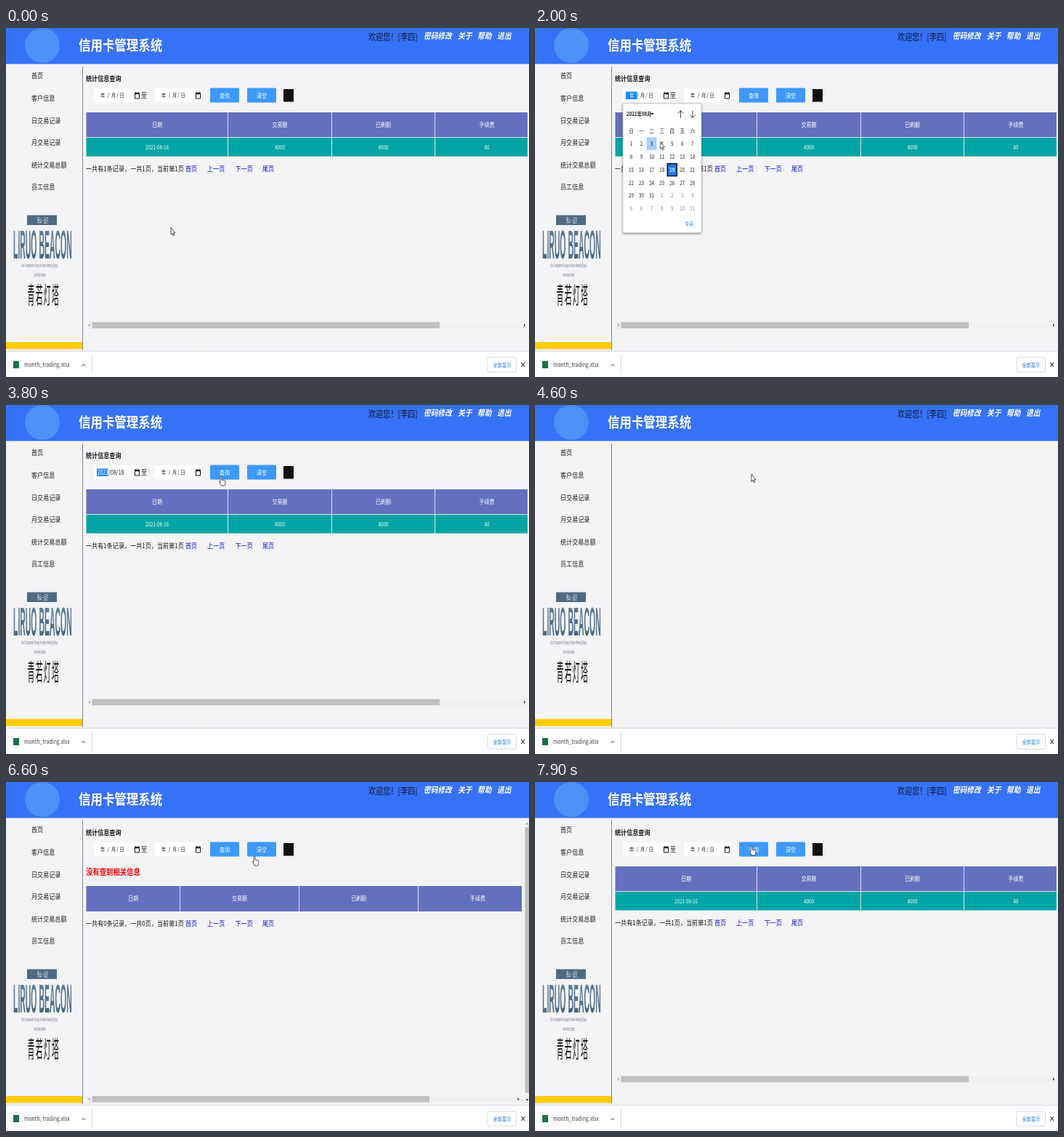
These frames come from a looping animation (720x480 px, 8 s). An HTML page:

```html
<!DOCTYPE html>
<html lang="zh-CN">
<head>
<meta charset="utf-8">
<title>信用卡管理系统</title>
<style>
html, body { margin: 0; width: 100%; height: 100%; overflow: hidden; background: #f4f3f6; }
svg { display: block; width: 720px; height: 480px; }

/* A 16:9 screen shown at 3:2 narrows all type evenly */
text {
  font: 9.6px "Noto Sans CJK SC", "Noto Sans CJK JP", sans-serif;
  fill: #1c1c1e;
  white-space: pre;
  transform: scaleX(.84375);
  transform-box: fill-box;
  transform-origin: 0 0;
}
.mid { text-anchor: middle; transform-origin: 50% 0; }
.small { font-size: 8.4px; }
.tiny { font-size: 7.4px; }
.white { fill: #fff; }
.bold { font-weight: 700; }
.title { font-size: 19.5px; font-weight: 900; }
.user { font-size: 12px; fill: #0c1836; }
.menu { font-size: 11.5px; font-weight: 700; font-style: italic; fill: #fff; }
.error { font-size: 11.1px; font-weight: 700; fill: #f00; }
.links text { fill: #1414e0; }
.pale { fill: #8a8a8e; }
.blue { fill: #1a73e8; }

.poster text { transform: scaleX(.31); }
.poster .word { font: bold 55px "Liberation Sans", Arial, sans-serif; fill: url(#ink); transform: scaleX(.19); }
.poster .fine { font: 8px "Liberation Sans", Arial, sans-serif; fill: #77777c; }
.poster .name { font-size: 32px; letter-spacing: 4px; }

.head { fill: #6370be; }
.row { fill: #00a5a3; }
.rule { stroke: #dfe3f2; fill: none; }
.track { fill: #f0eff1; }
.thumb { fill: #c0c0c1; }
.btn { fill: #3d99fc; }
.pick { fill: #1e8cff; }

.show { animation: 8s step-end infinite; }
.form { animation-name: form; }
.found { animation-name: found; }
.none { animation-name: none-found; }
.empty { animation-name: empty; }
.filled { animation-name: filled; }
.chosen { animation-name: chosen; }
.popup { animation-name: popup; }
.hover { animation-name: hover; }
.arrow { animation-name: arrow; }
.hand { animation-name: hand; }
.cursor { animation: move 8s linear infinite; }

@keyframes form { 0%, 61.2%, 97.4% { opacity: 1 } 57.4%, 94.9% { opacity: 0 } }
@keyframes found { 0%, 97.4% { opacity: 1 } 57.4% { opacity: 0 } }
@keyframes none-found { 0%, 94.9% { opacity: 0 } 61.2% { opacity: 1 } }
@keyframes empty { 0%, 80% { opacity: 1 } 36.2% { opacity: 0 } }
@keyframes filled { 0%, 80% { opacity: 0 } 36.2% { opacity: 1 } }
@keyframes chosen { 0%, 57.4% { opacity: 0 } 36.2% { opacity: 1 } }
@keyframes popup { 0%, 36.2% { opacity: 0 } 13.7% { opacity: 1 } }
@keyframes hover {
  0% { opacity: 0; transform: none }
  22.4% { opacity: 1; transform: none }
  26.2% { opacity: 1; transform: translate(14px, 17.8px) }
  28.7% { opacity: 1; transform: translate(14px, 35.6px) }
}
@keyframes arrow {
  0%, 57.4%, 75.6%, 85.2%, 94.9% { opacity: 1 }
  43%, 61.2%, 77.4%, 86.8%, 97.4% { opacity: 0 }
}
@keyframes hand {
  0%, 57.4%, 75.6%, 85.2%, 94.9% { opacity: 0 }
  43%, 61.2%, 77.4%, 86.8%, 97.4% { opacity: 1 }
}
@keyframes move {
  0%, 1.25% { transform: translate(227px, 274px) }
  8.75%, 16.25% { transform: translate(183px, 93px) }
  25% { transform: translate(172.5px, 156px) }
  30% { transform: translate(176px, 192px) }
  36.25% { transform: translate(176px, 194px) }
  43.75% { transform: translate(296px, 99px) }
  47.5% { transform: translate(296px, 98px) }
  57.5%, 72.5% { transform: translate(298px, 95px) }
  78.75%, 83.75% { transform: translate(342px, 102px) }
  90%, 100% { transform: translate(298px, 88px) }
}
</style>
</head>
<body>
<svg viewBox="0 0 720 480">
  <defs>
    <linearGradient id="ink" x2="0" y2="1">
      <stop offset=".2" stop-color="#5d7c9a"/>
      <stop offset="1" stop-color="#43627f"/>
    </linearGradient>
    <filter id="shadow" x="-10%" y="-10%" width="120%" height="120%">
      <feDropShadow dx="0" dy="1" stdDeviation="1.6" flood-opacity=".5"/>
    </filter>
    <g id="field">
      <rect x="121" y="83" width="65" height="19" fill="#fff"/>
      <path d="M177.5 89.5h6v7.5h-6z" fill="none" stroke="#111"/>
      <path d="M177 89h7v2.2h-7zM178.2 88h1v1h-1zM181.8 88h1v1h-1z" fill="#111"/>
    </g>
    <g id="bar">
      <rect class="track" x="111" y="404" width="607" height="9.500"/>
      <path d="M115.500 406.500v4.500l-2-2.250z" fill="#9a9a9a"/>
    </g>
  </defs>

  <rect width="720" height="480" fill="#f4f3f6"/>

  <!-- Header -->
  <rect width="720" height="49.500" fill="#3672f5"/>
  <circle cx="50" cy="24" r="24" fill="#4b91f8"/>
  <text class="title white" x="100" y="31">信用卡管理系统</text>
  <text class="user" x="499" y="17">欢迎您！[李四]</text>
  <text class="menu" x="575" y="15">密码修改</text>
  <text class="menu" x="622" y="15">关于</text>
  <text class="menu" x="649" y="15">帮助</text>
  <text class="menu" x="676" y="15">退出</text>

  <!-- Sidebar -->
  <text x="35" y="69.500">首页</text>
  <text x="35" y="100">客户信息</text>
  <text x="35" y="131">日交易记录</text>
  <text x="35" y="161.500">月交易记录</text>
  <text x="35" y="192">统计交易总额</text>
  <text x="35" y="222.500">员工信息</text>
  <g class="poster">
    <rect x="29" y="257.500" width="41" height="13.500" fill="#4f6a84"/>
    <text class="white" x="43" y="268">青山·远方</text>
    <text class="word" x="10" y="317">LIRUO BEACON</text>
    <text class="fine" x="21" y="329">Our Companion Group for New Hearing Days</text>
    <text class="fine" x="38.500" y="342">Activities Base</text>
    <text class="name" x="29.500" y="379">青若灯塔</text>
  </g>
  <rect y="432" width="105" height="9.500" fill="#fc0"/>
  <path d="M105.500 53V443" stroke="#85858a"/>

  <!-- Query form -->
  <g class="show form">
    <text class="bold" x="110" y="73">统计信息查询</text>
    <use href="#field"/>
    <use href="#field" x="84"/>
    <text x="186" y="96.500">至</text>
    <g class="show empty">
      <text class="tiny" x="130" y="95.500">年</text>
      <text class="tiny" x="140 146 154.500 159.500" y="95.500">/月/日</text>
    </g>
    <text class="tiny" x="214" y="95.500">年</text>
    <text class="tiny" x="224 230 238.500 243.500" y="95.500">/月/日</text>
    <g class="show filled">
      <text class="small" x="125.500" y="95.800">2021/08/18</text>
    </g>
    <g class="show chosen">
      <rect class="pick" x="125" y="87.500" width="15.500" height="10.500"/>
      <text class="small white" x="125.500" y="95.800">2021</text>
    </g>
    <rect class="btn" x="281" y="82.500" width="40" height="20" rx="1.500"/>
    <rect class="btn" x="332" y="82.500" width="40" height="20" rx="1.500"/>
    <text class="small white mid" x="301" y="96">查询</text>
    <text class="small white mid" x="352" y="96">清空</text>
    <rect x="382" y="84" width="14" height="17.500" fill="#111"/>
  </g>

  <!-- One record -->
  <g class="show found">
    <rect class="head" x="110.500" y="116" width="607.500" height="34.500"/>
    <rect class="row" x="110.500" y="151" width="607.500" height="25.500"/>
    <path class="rule" d="M110.500 150.500H718M305.500 116v60.500M448.500 116v60.500M590.500 116v60.500"/>
    <g class="heads">
      <text class="small white mid" x="208" y="136">日期</text>
      <text class="small white mid" x="377" y="136">交易额</text>
      <text class="small white mid" x="519.500" y="136">已刷额</text>
      <text class="small white mid" x="662" y="136">手续费</text>
    </g>
    <text class="tiny white mid" x="208" y="166.800">2021-08-16</text>
    <text class="tiny white mid" x="377" y="166.800">4000</text>
    <text class="tiny white mid" x="519.500" y="166.800">4000</text>
    <text class="tiny white mid" x="662" y="166.800">40</text>
    <text x="110" y="197.500">一共有1条记录，一共1页，当前第1页</text>
    <g class="links" id="links">
      <text x="247" y="197.500">首页</text>
      <text x="277" y="197.500">上一页</text>
      <text x="315.500" y="197.500">下一页</text>
      <text x="353" y="197.500">尾页</text>
    </g>
    <use href="#bar"/>
    <rect class="thumb" x="118.500" y="404.500" width="478.500" height="8.500"/>
    <path d="M713 406.500v4.500l2-2.250z" fill="#333"/>
  </g>

  <!-- No records -->
  <g class="show none">
    <text class="error" x="110" y="128">没有查到相关信息</text>
    <rect class="head" x="110.500" y="143" width="599.500" height="35"/>
    <path class="rule" d="M239.500 143v35M403.500 143v35M567.500 143v35"/>
    <text class="small white mid" x="175" y="163.500">日期</text>
    <text class="small white mid" x="321.500" y="163.500">交易额</text>
    <text class="small white mid" x="485.500" y="163.500">已刷额</text>
    <text class="small white mid" x="649.500" y="163.500">手续费</text>
    <text x="110" y="198.500">一共有0条记录，一共0页，当前第1页</text>
    <use href="#links" y="1"/>
    <use href="#bar" y="27.500"/>
    <rect class="thumb" x="118.500" y="432" width="464.500" height="8.500"/>
    <path d="M704.500 434v4.500l2-2.250z" fill="#333"/>
    <rect class="track" x="714" y="53" width="6" height="388"/>
    <rect class="thumb" x="714.500" y="62" width="5.500" height="365.500"/>
    <path d="M715.500 58.500h4l-2-2.500z" fill="#9a9a9a"/>
    <path d="M715.500 436h4l-2 2.500z" fill="#333"/>
  </g>

  <!-- Date picker -->
  <g class="show popup">
    <rect class="pick" x="125" y="87.500" width="15.500" height="10.500"/>
    <text class="tiny white" x="130" y="95.500">年</text>
    <rect x="121" y="104" width="108" height="177.500" rx="1" fill="#fff" stroke="#b5b5b8" stroke-width=".6" filter="url(#shadow)"/>
    <text class="tiny bold" x="126" y="121">2021年08月</text>
    <path d="M159.500 117h4l-2 2.800z" fill="#111"/>
    <path d="M200.500 123.500v-10m-3.500 4l3.500-4 3.500 4M217 113.500v10m-3.500-4l3.500 4 3.500-4" fill="none" stroke="#444"/>
    <rect class="show hover" x="153.500" y="150.500" width="14" height="17.500" fill="#a9d0f8"/>
    <rect x="182.300" y="186.500" width="13" height="17" fill="#1a78f0" stroke="#111" stroke-width="1.500"/>
    <g id="days"></g>
    <text class="tiny blue" x="206" y="272.500">今天</text>
  </g>

  <!-- Download shelf -->
  <rect y="444" width="720" height="36" fill="#fdfcfe"/>
  <path d="M0 444.500H720" stroke="#d9d8dc"/>
  <rect x="10" y="458" width="8" height="10" fill="#1f7246"/>
  <text x="25" y="466.300" style="font-size:8.2px;fill:#444">month_trading.xlsx</text>
  <path d="M104.500 465l2.300-2.800 2.300 2.800" fill="none" stroke="#555"/>
  <path d="M118.500 449v27" stroke="#dcdce0"/>
  <rect x="663" y="453" width="39.500" height="20" rx="2" fill="#fff" stroke="#d6dae2"/>
  <text class="tiny blue mid" x="683" y="466">全部显示</text>
  <path d="M709.500 460.200l4.500 5.600m0-5.600l-4.500 5.600" stroke="#444" stroke-width="1.100"/>

  <!-- Pointer -->
  <g class="cursor" fill="#fff" stroke="#222" stroke-width=".8" stroke-linejoin="round">
    <path class="show arrow" d="M0 0V10.200L2 8.400 3.300 11.700 4.700 11 3.400 7.800H5.800z"/>
    <path class="show hand" d="M0 0q1 0 1 1v4l4 .8q1 .3 1 1.400l-.4 3.400-1 2.400H.6l-2.800-4.400q-.5-1 .2-1.200.5 0 1 .8V1q0-1 1-1z"/>
  </g>
</svg>
<script>
const days = document.getElementById("days");

function cell(col, y, label, tone = "") {
  const t = document.createElementNS("http://www.w3.org/2000/svg", "text");
  t.setAttribute("class", "tiny mid " + tone);
  t.setAttribute("x", 132.5 + col * 14.05);
  t.setAttribute("y", y);
  t.textContent = label;
  days.append(t);
}

[..."日一二三四五六"].forEach((name, col) => cell(col, 143.7, name));
for (let i = 0; i < 42; i++) {
  const day = i % 31 + 1;
  const tone = i > 30 ? "pale" : day === 19 ? "white bold" : "";
  cell(i % 7, 162.3 + Math.floor(i / 7) * 17.8, day, tone);
}
</script>
</body>
</html>
```
